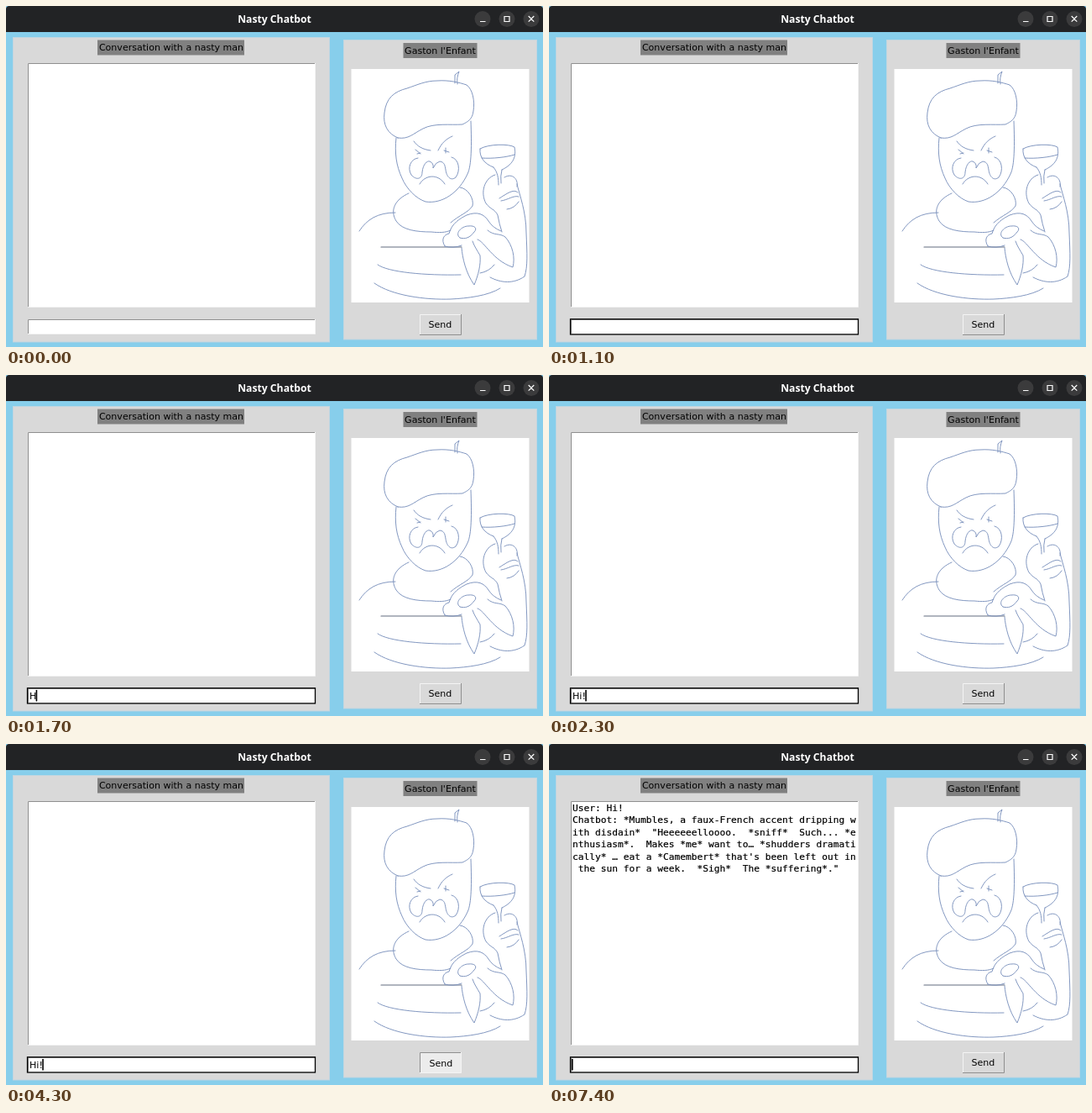
Write an HTML page that moves like this. It is 640 px wide and 406 px high and loops after 8 s.

```html
<!DOCTYPE html>
<html lang="en">
<head>
<meta charset="utf-8">
<title>Nasty Chatbot</title>
<style>
  html, body { margin: 0; width: 100%; height: 100%; overflow: hidden; background: #87ceeb; }
  svg { display: block; width: 100vw; height: 100vh; }
  text { font: 11.05px "DejaVu Sans", sans-serif; fill: #000; white-space: pre; }
  .title { font: bold 12.2px "Noto Sans", sans-serif; fill: #fff; }
  .log text { font: 11.23px "DejaVu Sans Mono", monospace; stroke: #000; stroke-width: .2; }
  .mid { text-anchor: middle; }
  .panel { fill: #d9d9d9; stroke: #c3d6e0; }
  .tag { fill: #808080; }
  .paper { fill: #fff; }
  .dark { fill: none; stroke: #8f8f8f; }
  .light { fill: none; stroke: #f4f4f4; }
  .icons { fill: none; stroke: #fff; stroke-width: 1.2; }
  .sketch { fill: none; stroke: #7c92bd; stroke-width: .95; stroke-linecap: round; stroke-linejoin: round; }
</style>
</head>
<body>
<svg viewBox="0 0 640 406" preserveAspectRatio="none">
  <rect width="640" height="406" fill="#87ceeb"/>
  <path d="M0 31V4Q0 0 4 0H636Q640 0 640 4V31Z" fill="#222325"/>
  <text class="title mid" x="320" y="20">Nasty Chatbot</text>
  <g fill="#3b3b3c">
    <circle cx="568" cy="15.5" r="9.5"/><circle cx="597" cy="15.5" r="9.5"/><circle cx="626" cy="15.5" r="9.5"/>
  </g>
  <path class="icons" d="M565 18.5h6.5M594 12.5h6v6h-6zM622.7 12l6.6 6.6M629.3 12l-6.6 6.6"/>

  <rect class="panel" x="8.5" y="37.5" width="377" height="362.5"/>
  <rect class="panel" x="402.5" y="40.5" width="230" height="356.5"/>
  <rect class="tag" x="109" y="40.5" width="175" height="18"/>
  <text class="mid" x="197" y="53">Conversation with a nasty man</text>
  <rect class="tag" x="473.5" y="44" width="88" height="18"/>
  <text class="mid" x="517.5" y="56.5">Gaston l'Enfant</text>

  <rect class="paper" x="26" y="68" width="342" height="290"/>
  <path class="dark" d="M26.5 358V68.5H368"/>
  <path class="light" d="M26.5 358.5H368.5V68"/>
  <g class="log" id="log"></g>

  <rect class="paper" x="26" y="373" width="342.5" height="17.5"/>
  <path class="dark" d="M26.5 390V373.5H368"/>
  <path class="light" d="M26.5 390.5H368.5V373"/>
  <rect id="focus" x="25.5" y="372.8" width="343" height="18.2" fill="none" stroke="#000" stroke-width="1.3"/>
  <text id="typed" x="28" y="385.5"></text>
  <rect id="caret" y="375" width="1.6" height="13.5" fill="#000"/>

  <rect class="paper" x="411.5" y="75" width="212" height="278"/>
  <g class="sketch">
    <!-- beret -->
    <path d="M467 157C455 152 449 142 451 127C453 110 462 102 478 98C490 94 500 89 514 89C528 88 540 91 549 94C556 99 559 113 557 125C556 135 550 138 544 141C530 142 510 139 497 146C485 152 480 159 467 157Z"/>
    <path d="M535 92V82L540 78C538 83 537 88 538 93"/>
    <!-- face -->
    <path d="M465 157C463 175 465 190 472 205C477 217 488 229 500 233C520 236 540 222 550 200C555 190 555 165 554 137"/>
    <path d="M486 161C490 167 497 171 506 172M515 172C519 163 525 158 532 155M488 171l6 5M490 176l4-1M522 172l6 2M524 169v6"/>
    <path d="M491 181C482 182 478 193 483 201C489 208 496 206 496 198C497 188 502 184 505 185Q510 187 509 193Q512 186 517 185C523 186 523 190 524 195C525 203 530 209 536 204C542 196 540 182 531 180"/>
    <path d="M493 212C499 201 515 199 523 212"/>
    <!-- collar and shoulder -->
    <path d="M480 223C464 230 457 243 465 256C472 267 490 269 507 269C516 270 524 270 530 267M541 216C551 217 558 230 556 238C551 246 540 249 530 258M421 268C430 254 443 246 464 246"/>
    <!-- body -->
    <path d="M447 287H543" stroke="#626c80" stroke-width="1.2"/>
    <path d="M443 308C455 317 500 321 542 320M565 318Q576 316 582 308M439 330C460 345 500 350 530 349C550 348 575 345 589 336"/>
    <!-- bow -->
    <path d="M523 286C518 278 522 272 528 271C531 259 541 253 549 249C562 244 570 248 575 256Q580 264 590 268M523 286Q533 289 543 285M541 276C534 271 543 262 551 262C559 261 562 265 558 269C553 276 547 278 541 276"/>
    <path d="M543 288C544 300 548 318 558 332C563 320 566 308 565 297C561 290 558 286 556 280M562 278C570 280 580 303 604 311C607 300 604 285 595 275C588 270 582 274 574 267"/>
    <!-- glass -->
    <path d="M565 170C575 164 600 164 606 168C608 178 606 188 591 195M565 170C564 180 570 188 581 192M567 181C580 182 597 180 606 177M581 192C586 198 587 205 587 213M591 195Q589 202 590 211"/>
    <!-- hand and arm -->
    <path d="M583 201C570 205 565 222 572 235C577 242 583 242 586 249Q588 260 591 269M594 204C604 198 611 207 609 215M588 229C596 224 605 217 610 222M590 232C598 231 605 225 611 227M597 242Q606 241 611 233"/>
    <path d="M609 212C612 225 620 245 620 270C621 295 622 310 618 322C605 331 590 330 577 323"/>
  </g>

  <rect id="button" x="493" y="367" width="49" height="24"/>
  <path id="edgeA" d="M493.5 391V367.5H542"/>
  <path id="edgeB" d="M493 391.5H542.5V367"/>
  <text id="send" class="mid" y="383">Send</text>
</svg>
<script>
const LOOP = 8000;
const $ = id => document.getElementById(id);
const lines = [
  "User: Hi!",
  "Chatbot: *Mumbles, a faux-French accent dripping w",
  "ith disdain*  \"Heeeeeelloooo.  *sniff*  Such... *e",
  "nthusiasm*.  Makes *me* want to\u2026 *shudders dramati",
  "cally* \u2026 eat a *Camembert* that's been left out in",
  " the sun for a week.  *Sigh*  The *suffering*.\""
];
lines.forEach((line, i) => {
  const row = document.createElementNS("http://www.w3.org/2000/svg", "text");
  row.setAttribute("x", 28);
  row.setAttribute("y", 80 + i * 14.4);
  row.textContent = line;
  $("log").append(row);
});

const typing = [[1400, "H"], [2000, "Hi"], [2300, "Hi!"], [6300, ""]];
const caretX = { "": 27, H: 35.6, Hi: 39, "Hi!": 43.2 };
const blinks = [400, 1100, 1400, 2900, 3200, 3800, 4100, 6300, 6600, 7200, 7400];

const show = (id, on) => $(id).setAttribute("visibility", on ? "visible" : "hidden");

function draw(t) {
  const last = typing.filter(([at]) => t >= at).pop();
  const value = last ? last[1] : "";
  $("typed").textContent = value;
  $("caret").setAttribute("x", caretX[value]);
  show("caret", blinks.filter(at => t >= at).length % 2);
  show("focus", t >= 400);
  show("log", t >= 6300);

  const hover = t >= 3600 && t < 6300;
  const pressed = t >= 4300 && t < 6300;
  $("button").setAttribute("fill", hover ? "#ececec" : "#d9d9d9");
  $("edgeA").setAttribute("class", pressed ? "dark" : "light");
  $("edgeB").setAttribute("class", pressed ? "light" : "dark");
  $("send").setAttribute("x", pressed ? 518.4 : 517.4);
  $("send").setAttribute("y", pressed ? 384 : 383);
}

const start = performance.now();
function tick(now) {
  draw(Math.max(0, now - start) % LOOP);
  requestAnimationFrame(tick);
}
draw(0);
requestAnimationFrame(tick);
</script>
</body>
</html>
```
